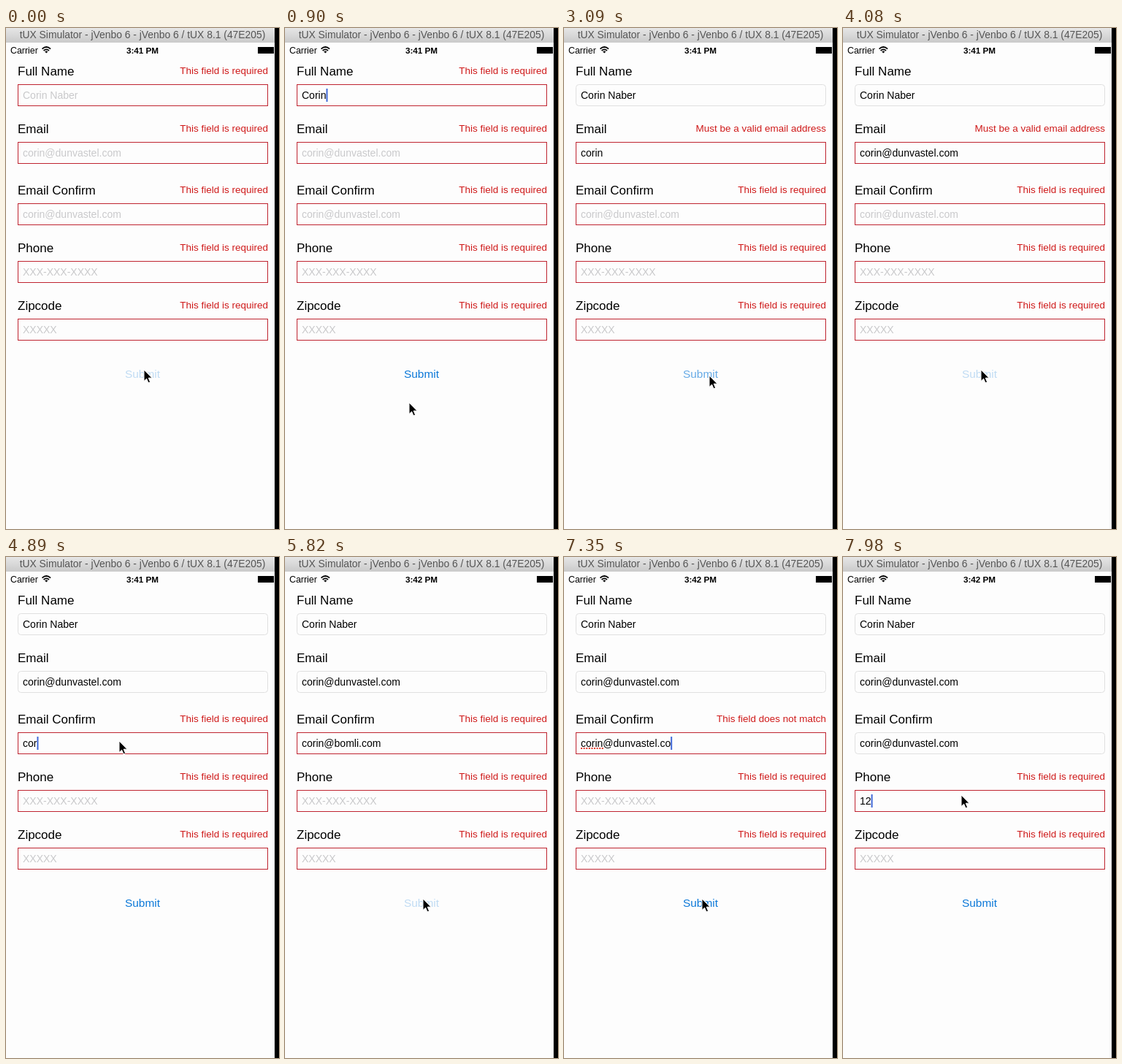
Animation, 374 px wide and 686 px high, one loop 8 s. Source, as an HTML page:

```html
<!DOCTYPE html>
<html lang="en">
<head>
<meta charset="utf-8">
<title>Form validation</title>
<style>
  html, body { margin: 0; width: 100%; height: 100%; overflow: hidden; background: #fdfdfd; }
  svg { display: block; width: 374px; height: 686px; font-family: "Liberation Sans", Arial, sans-serif; }
  text { white-space: pre; }
  .title { font-size: 13.87px; fill: #555; text-anchor: middle; }
  .carrier { font-size: 12.4px; }
  .clock { font-size: 11.7px; font-weight: bold; text-anchor: middle; }
  .label { font-size: 17px; }
  .error { font-size: 13.5px; fill: #cf1a1a; text-anchor: end; }
  .value { font-size: 14px; fill: #000; }
  .value.hint { fill: #c9c9cb; }
  .box { fill: none; stroke: #bf2430; }
  .box.ok { stroke: #e0e0e0; }
  .submit { font-size: 15.4px; fill: #0b78d8; text-anchor: middle; }
  .squiggle { stroke: #e23a2c; stroke-width: 2; stroke-dasharray: 2 1.6; }
</style>
</head>
<body>
<svg viewBox="0 0 374 686">
  <defs>
    <linearGradient id="bar" x2="0" y2="1">
      <stop stop-color="#e6e6e6"/>
      <stop offset="1" stop-color="#cacaca"/>
    </linearGradient>
  </defs>
  <rect width="374" height="686"/>
  <rect width="368" height="686" fill="#fdfdfd"/>
  <rect width="368" height="20" fill="url(#bar)"/>
  <text class="title" x="187" y="14">tUX Simulator - jVenbo 6 - jVenbo 6 / tUX 8.1 (47E205)</text>
  <text class="carrier" x="6" y="35">Carrier</text>
  <g fill="none" stroke="#000" stroke-width="1.7">
    <path d="M49.5 28.6Q55.3 23.4 61.1 28.6M51.6 31Q55.3 27.8 59 31"/>
    <path d="M53.2 32.2Q55.3 30.6 57.4 32.2L55.3 34.6Z" fill="#000" stroke="none"/>
  </g>
  <text class="clock" id="clock" x="187" y="34.5"></text>
  <rect x="345" y="26" width="22" height="9"/>
  <g id="form"></g>
  <path class="squiggle" id="squiggle" d="M23 262H54"/>
  <rect id="caret" width="2" height="18" fill="#4169d8"/>
  <text class="submit" id="submit" x="187" y="478.5">Submit</text>
  <path id="cursor" d="M0 0V15.5L3.6 12.2L6 17.8L8.6 16.7L6.2 11.2H11Z" stroke="#fff"/>
</svg>
<script>
const LOOP = 8000, STEP = 30;
const KEY_TIME = 43, BLINK = 220, CLICK = 330, VERDICT = 60;
const NAME = 'Corin Naber', MAIL = 'corin@dunvastel.com';
const REQUIRED = 'This field is required', MISMATCH = 'This field does not match';
const BUTTON = [189, 468];
const $ = id => document.getElementById(id);

const checks = [
  text => /\S \S/.test(text) ? '' : 'Please provide a first & last name',
  text => /@.+\./.test(text) ? '' : 'Must be a valid email address',
  (text, values) => text === values[1] ? '' : MISMATCH
];

const fields = [
  ['Full Name', NAME],
  ['Email', MAIL],
  ['Email Confirm', MAIL],
  ['Phone', 'XXX-XXX-XXXX'],
  ['Zipcode', 'XXXXX']
].map(([label, hint], i) => {
  const top = 77 + 79 * i + (i > 1 ? 5 : 0);
  const add = (tag, attrs) => {
    const el = document.createElementNS('http://www.w3.org/2000/svg', tag);
    for (const key in attrs) el.setAttribute(key, attrs[key]);
    return $('form').appendChild(el);
  };
  add('text', { class: 'label', x: 16, y: top - 12 }).textContent = label;
  return {
    top, hint,
    box: add('rect', { class: 'box', x: 16.5, y: top + .5, width: 342, height: 29 }),
    error: add('text', { class: 'error', x: 359, y: top - 14 }),
    value: add('text', { class: 'value', x: 23, y: top + 19.5 })
  };
});

// Each round presses Submit, clicks a field, edits it and heads back to the button.
const rounds = [
  { press: 0, field: 0, text: 'Corin', rest: [170, 513] },
  { press: 1140, field: 0, text: NAME },
  { press: 2070, field: 1, text: 'corin', rest: [200, 515] },
  { press: 2970, field: 1, text: MAIL, button: [199, 476] },
  { press: 4080, field: 2, text: 'corin@bomli.com' },
  { press: 5820, field: 2, text: MAIL, rest: [189, 273] },
  { press: 7410, field: 3, text: '12', rest: [162, 326] }
];
rounds.forEach((round, i) => {
  const next = rounds[i + 1] || { press: 8300 };
  const length = next.press - round.press;
  const target = [155, fields[round.field].top + 12];
  const rest = round.rest || target;
  round.typing = round.press + .4 * length;
  round.path = [
    [round.press + 120, round.button || BUTTON],
    [round.press + CLICK, target],
    [round.press + length / 2, rest],
    [next.press - 240, rest],
    [next.press - 60, next.button || BUTTON]
  ];
});

const clamp = v => Math.max(0, Math.min(1, v));
const mix = (a, b, p) => a + (b - a) * p;
const show = (id, on) => { $(id).style.display = on ? '' : 'none'; };

// Deletes back to the shared beginning, then types the rest.
function edit(from, to, keys) {
  let shared = 0;
  while (shared < from.length && from[shared] === to[shared]) shared++;
  const deletes = from.length - shared;
  return keys <= deletes
    ? from.slice(0, from.length - keys)
    : to.slice(0, shared + keys - deletes);
}

function textAt(field, t) {
  return rounds
    .filter(r => r.field === field && r.typing <= t)
    .reduce((text, r) => edit(text, r.text, Math.round((t - r.typing) / KEY_TIME)), '');
}

function messagesAt(t) {
  const last = rounds.filter(r => r.press + VERDICT <= t).pop() || rounds[0];
  const values = fields.map((_, i) => textAt(i, last.press));
  return values.map((text, i) => text ? checks[i](text, values) : REQUIRED);
}

function cursorAt(path, t) {
  const i = path.findIndex(([time]) => time > t);
  if (i === 0) return path[0][1];
  if (i < 0) return path[path.length - 1][1];
  const [t0, from] = path[i - 1], [t1, to] = path[i];
  const p = 1 - (1 - (t - t0) / (t1 - t0)) ** 2;
  return from.map((v, axis) => mix(v, to[axis], p));
}

function drawField(field, text, message) {
  field.value.textContent = text || field.hint;
  field.value.classList.toggle('hint', !text);
  field.error.textContent = message;
  field.box.classList.toggle('ok', !message);
  field.box.setAttribute('rx', message ? 0 : 4);
}

function drawCaret(round, t) {
  const field = fields[round.field], text = textAt(round.field, t);
  const busy = t >= round.typing && text !== round.text;
  show('caret', t >= round.press + CLICK && (busy || Math.floor(t / BLINK) % 2 === 0));
  $('caret').setAttribute('x', 23 + (text ? field.value.getComputedTextLength() : 0));
  $('caret').setAttribute('y', field.top + 6);
}

function draw(now) {
  const t = Math.floor((now % LOOP) / STEP) * STEP;
  const round = rounds.filter(r => r.press <= t).pop();
  const since = t - round.press;
  const messages = messagesAt(t);
  fields.forEach((field, i) => drawField(field, textAt(i, t), messages[i]));
  drawCaret(round, t);
  show('squiggle', since >= CLICK && messages[round.field] === MISMATCH);
  $('submit').setAttribute('opacity', mix(.25, 1, clamp((since - 60) / 120)));
  $('cursor').setAttribute('transform', `translate(${cursorAt(round.path, t)})`);
  $('clock').textContent = t < 5400 ? '3:41 PM' : '3:42 PM';
}

const begin = performance.now();
function tick() {
  draw(performance.now() - begin);
  requestAnimationFrame(tick);
}
tick();
</script>
</body>
</html>
```
